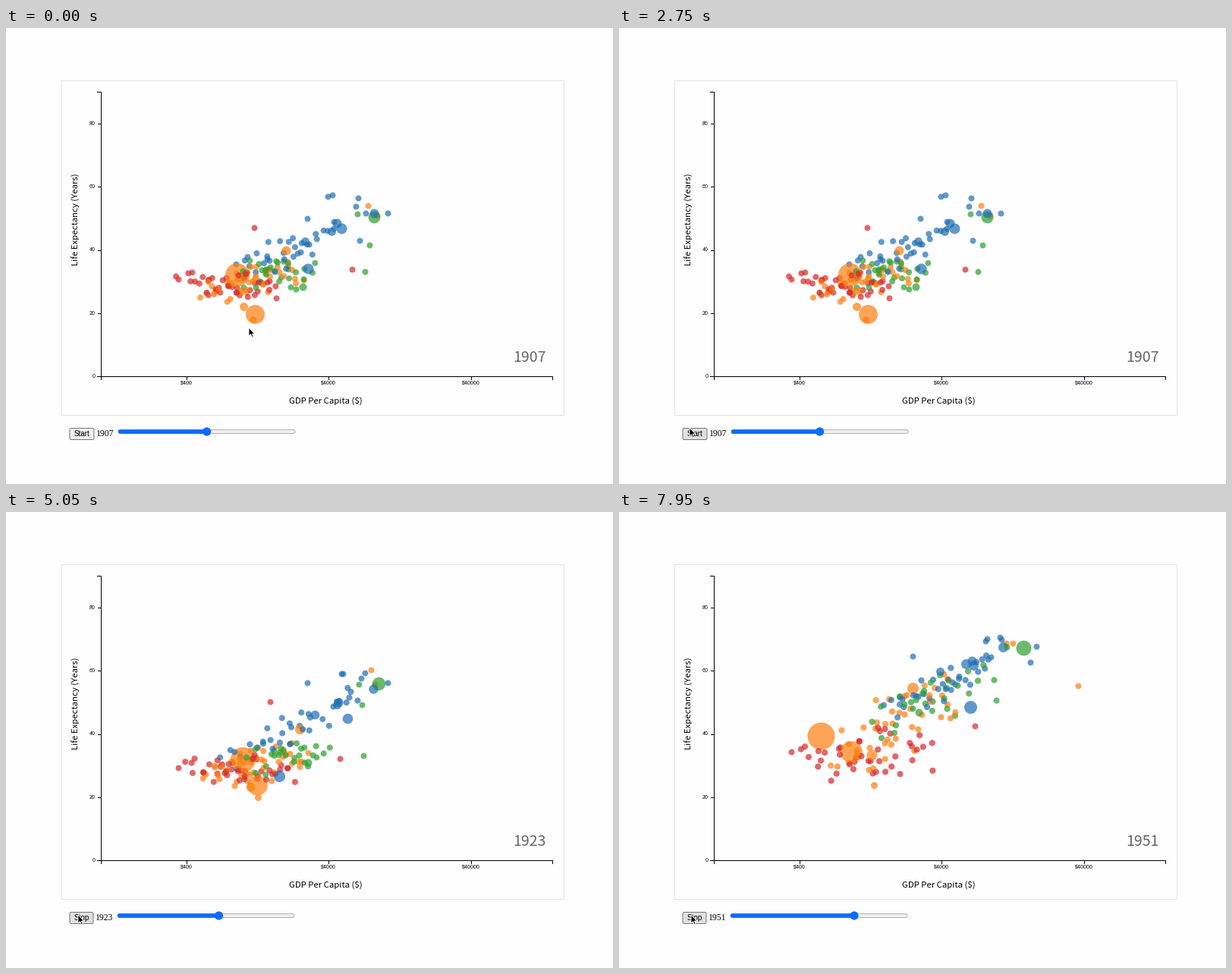
Animation, 800 px wide and 601 px high, one loop 8 s. Source, as a matplotlib script:

```python
import numpy as np
import matplotlib.pyplot as plt
from matplotlib.animation import FuncAnimation
from matplotlib.patches import Circle, FancyBboxPatch, Polygon, Rectangle

W, H, DPI = 800, 601, 100
STEP, LOOP = 50, 8000
RUN_START, YEAR_MS, FIRST_YEAR = 3300, 105, 1907
KEY_T = np.array([RUN_START, 4050, 5050, 6950, 7950])
HOLDS = [(5050, 5250), (5250, 5400), (5500, 5650),
         (6800, 6950), (6950, 7050), (7100, 7250)]

BLUE, ORANGE, GREEN, RED = "#1f6fb4", "#ff7f0e", "#2ca02c", "#d62728"
PAGE, ACCENT = "#fefdff", "#0a6cff"
HUMANIST, SANS, SERIF = "Noto Sans CJK JP", "Liberation Sans", "Liberation Serif"

# Most populous countries: first and last radius, one waypoint per key time
GIANTS = [
    (BLUE, 7, 8.5, (398, 317), (410, 318), (360, 348), (449, 297), (463, 257)),
    (BLUE, 7, 6.5, (442, 264), (447, 255), (450, 272), (487, 203), (457, 200)),
    (BLUE, 6, 6, (436, 257), (442, 247), (438, 251), (452, 222), (465, 196)),
    (BLUE, 5.5, 6.5, (394, 281), (397, 276), (407, 267), (463, 225), (467, 202)),
    (GREEN, 8, 10, (485, 249), (486, 238), (491, 226), (504, 200), (533, 179)),
    (BLUE, 6, 6.5, (485, 244), (486, 237), (484, 233), (499, 200), (506, 178)),
    (ORANGE, 15.5, 18, (304, 325), (307, 324), (312, 326), (306, 315), (266, 295)),
    (ORANGE, 12.5, 14.5, (328, 377), (335, 363), (331, 360), (319, 324), (306, 316)),
    (ORANGE, 6, 7.5, (369, 293), (370, 291), (387, 286), (409, 255), (387, 232)),
    (ORANGE, 5.5, 7, (313, 367), (320, 365), (322, 362), (363, 311), (333, 320)),
]
# Countries off the crowd: radius, places at the start, middle and end
OUTLIERS = [
    (BLUE, 4, (503, 244), (503, 225), (550, 177)),
    (BLUE, 4, (397, 251), (397, 225), (387, 190)),
    (BLUE, 4, (430, 220), (444, 213), (502, 165)),
    (BLUE, 4, (464, 224), (473, 212), (504, 168)),
    (BLUE, 4, (461, 235), (468, 219), (542, 198)),
    (BLUE, 4, (466, 280), (463, 248), (490, 191)),
    (BLUE, 4, (474, 244), (452, 244), (483, 170)),
    (BLUE, 4, (424, 222), (442, 213), (485, 167)),
    (BLUE, 5.5, (429, 268), (436, 254), (423, 210)),
    (GREEN, 4, (463, 245), (465, 227), (511, 178)),
    (GREEN, 4, (479, 286), (469, 254), (494, 221)),
    (GREEN, 4, (473, 321), (471, 321), (497, 248)),
    (GREEN, 5, (391, 341), (398, 330), (395, 264)),
    (ORANGE, 4, (477, 234), (481, 208), (510, 173)),
    (ORANGE, 4, (489, 247), (486, 227), (519, 173)),
    (ORANGE, 4, (392, 332), (398, 317), (605, 229)),
    (ORANGE, 4.5, (325, 384), (332, 376), (336, 360)),
    (RED, 4, (327, 263), (348, 250), (433, 220)),
    (RED, 4, (456, 318), (440, 325), (469, 282)),
    (RED, 4, (227, 331), (227, 337), (227, 316)),
]
# Crowd per continent: count, then centre x, y, half width, slope, scatter per key
CROWDS = [
    (BLUE, 33, [(368, 294, 66, -0.42, 13), (376, 288, 68, -0.42, 14),
                (372, 288, 90, -0.52, 13), (402, 248, 74, -0.52, 13),
                (422, 230, 75, -0.45, 13)]),
    (GREEN, 27, [(358, 326, 45, 0, 14), (362, 326, 45, 0, 14),
                 (373, 323, 50, -0.1, 13), (398, 280, 62, -0.2, 21),
                 (408, 252, 68, -0.45, 22)]),
    (ORANGE, 42, [(322, 335, 63, -0.18, 11), (324, 333, 67, -0.18, 11),
                  (328, 334, 66, -0.12, 13), (352, 311, 70, -0.2, 22),
                  (364, 285, 80, -0.42, 26)]),
    (RED, 41, [(296, 335, 63, 0.06, 10), (298, 333, 64, 0.06, 9),
               (308, 337, 70, 0.05, 9), (316, 329, 78, 0, 10),
               (328, 314, 86, -0.1, 19)]),
]


def crowd(count, shape, rng):
    """Dots keep their rank in a slanted cloud while the cloud moves."""
    cx, cy, half, slope, scatter = np.array(shape, float).T
    along = np.linspace(-1, 1, count) + rng.uniform(-0.06, 0.06, count)
    along = 0.75 * along + 0.25 * along ** 3
    across = np.clip(rng.normal(size=count), -1.7, 1.7)
    run = along[:, None] * half
    rise = slope * run + across[:, None] * scatter
    wobble = rng.normal(size=(count, len(cx), 2)) * 3
    return np.stack([cx + run, cy + rise], axis=-1) + wobble


def build():
    rng = np.random.default_rng(7)
    paths, radii, colors = [], [], []

    def add(color, r0, r1, path):
        paths.append(np.array(path, float))
        radii.append((r0, r1))
        colors.append(color)

    for color, r0, r1, *path in GIANTS:
        add(color, r0, r1, path)
    for color, r, *stops in OUTLIERS:
        xs, ys = np.transpose(stops)
        at = KEY_T[[0, 2, 4]]
        path = np.column_stack([np.interp(KEY_T, at, xs), np.interp(KEY_T, at, ys)])
        add(color, r, r, path)
    for color, count, shape in CROWDS:
        for path in crowd(count, shape, rng):
            add(color, 4, 4.1, path)

    # giants keep their stacking; small dots are mixed above and below them
    n, total = len(GIANTS), len(colors)
    small = n + rng.permutation(total - n)
    cut = len(small) // 2
    order = np.concatenate([small[:cut], np.arange(n), small[cut:]])
    return (np.array(paths)[order], np.array(radii)[order],
            [colors[i] for i in order])


paths, radii, colors = build()

fig = plt.figure(figsize=(W / DPI, H / DPI), dpi=DPI, facecolor=PAGE)
ax = fig.add_axes([0, 0, 1, 1])
ax.set_xlim(0, W)
ax.set_ylim(H, 0)
ax.axis("off")


def label(x, y, s, px, font=HUMANIST, color="black", **kw):
    return ax.text(x, y, s, fontsize=px * 72 / DPI, family=font, color=color,
                   parse_math=False, **kw)


def line(xs, ys, color="black"):
    ax.plot(np.array(xs) + 0.5, np.array(ys) + 0.5, color=color, lw=0.72,
            solid_capstyle="projecting", zorder=1)


def rounded(x0, y0, x1, y1, r, **kw):
    box = FancyBboxPatch((x0, y0), x1 - x0, y1 - y0,
                         boxstyle=f"round,pad=0,rounding_size={r}", **kw)
    return ax.add_patch(box)


# Chart frame and axes
ax.add_patch(Rectangle((72.5, 68.5), 662, 441, fc="none", ec="#e3e2e4", lw=0.72))
line([0, W], [600, 600], "#b8b8b8")
line([119, 124, 124, 119], [83, 83, 458, 458])
line([124, 124, 719, 719], [462, 458, 458, 462])
for i in range(5):
    y = 458 - 83.25 * i
    line([120, 124], [round(y), round(y)])
    label(118, y + 3, str(20 * i), 7.2, SANS, ha="right")
    if i == 4:
        break
for i in range(3):
    x = 237 + 187.5 * i
    line([round(x), round(x)], [458, 462])
    label(x + 0.5, 469.8, f"${4 * 10 ** (i + 2)}", 7.2, SANS, ha="center")
label(421.5, 494.5, "GDP Per Capita ($)", 11.4, ha="center")
label(95.5, 252, "Life Expectancy (Years)", 11.4, ha="center", va="baseline",
      rotation=90, rotation_mode="anchor")
big_year = label(711.5, 440, "", 19.5, color="#666666", ha="right")

dots = ax.scatter(paths[:, 0, 0], paths[:, 0, 1], c=colors, alpha=0.7,
                  linewidths=0, zorder=2)

# Controls below the chart
button = rounded(84, 527.5, 116, 542.5, 2, fc="#efefef", ec="#767676", lw=0.72)
button_text = label(100, 538.3, "", 9.9, SANS, ha="center")
small_year = label(119, 538, "", 11.6, SERIF)
track = rounded(148, 529.5, 381, 534.5, 2.5, fc="#efefef", ec="#b2b2b2", lw=0.72)
filled = rounded(148, 529.2, 264, 534.8, 2.5, fc=ACCENT, ec="none")
thumb = ax.add_patch(Circle((264.5, 532), 5.6, fc=ACCENT, ec="none", zorder=3))

# Tooltip
TIP_LINES = ["Country: India", "Continent: asia", "Population: 245946689",
             "Income (GDP): 1225$", "Life Expectancy: 19.24 years"]
tooltip = [rounded(287, 277, 447.5, 358.5, 4, fc="black", ec="none",
                   alpha=0.8, zorder=4)]
tooltip += [label(292, 294.6 + 14 * i, s, 11.45, color="white", zorder=5)
            for i, s in enumerate(TIP_LINES)]

# Mouse pointer
ARROW = np.array([(0, 0), (0, 11), (2.6, 8.6), (4.4, 12.6), (6.1, 11.9),
                  (4.4, 8), (7.8, 8)])
pointer = ax.add_patch(Polygon(ARROW, fc="black", ec="white", lw=0.6, zorder=6))
POINTER_T = [0, 100, 500, 1300, 1700, 2400, 2750, 3000]
POINTER_X = [320, 321, 331, 331, 323, 92, 93, 95]
POINTER_Y = [395, 394, 372, 372, 404, 522, 527, 531]


def shown_time(t):
    for a, b in HOLDS:
        if a <= t < b:
            return a
    return t


def bubbles(t):
    t = np.clip(t, KEY_T[0], KEY_T[-1])
    k = min(np.searchsorted(KEY_T, t, side="right") - 1, len(KEY_T) - 2)
    f = (t - KEY_T[k]) / (KEY_T[k + 1] - KEY_T[k])
    spot = paths[:, k] * (1 - f) + paths[:, k + 1] * f
    grow = (t - KEY_T[0]) / (KEY_T[-1] - KEY_T[0])
    r = radii[:, 0] * (1 - grow) + radii[:, 1] * grow
    return spot + 0.5, (2 * r * 72 / DPI) ** 2


def draw(frame):
    t = shown_time(frame * STEP)
    running = t >= RUN_START
    shift = 1 if running else 0
    year = FIRST_YEAR + max(0, (t - RUN_START) // YEAR_MS)

    spot, size = bubbles(t)
    dots.set_offsets(spot)
    dots.set_sizes(size)

    big_year.set_text(str(year))
    small_year.set_text(str(year))
    small_year.set_x(119 - shift)
    button_text.set_text("Stop" if running else "Start")
    button_text.set_x(100 - shift / 2)
    button.set_width(32 - shift)
    track.set_x(148 - shift)
    filled.set_x(148 - shift)
    knob = 264.6 - shift + 1.054 * (year - FIRST_YEAR)
    filled.set_width(knob - 148 + shift)
    thumb.center = (knob, 532)

    px = np.interp(t, POINTER_T, POINTER_X)
    py = np.interp(t, POINTER_T, POINTER_Y)
    pointer.set_xy(ARROW + (px, py))
    hover_button = 84 <= px <= 116 and py >= 522
    button.set_facecolor("#e0e0e0" if hover_button else "#efefef")
    hovered = np.hypot(px - 328, py - 377.5) < 12.5
    for part in tooltip:
        part.set_visible(hovered)
    return []


anim = FuncAnimation(fig, draw, frames=LOOP // STEP, interval=STEP,
                     repeat=True, repeat_delay=0, blit=False)
plt.show()
```
